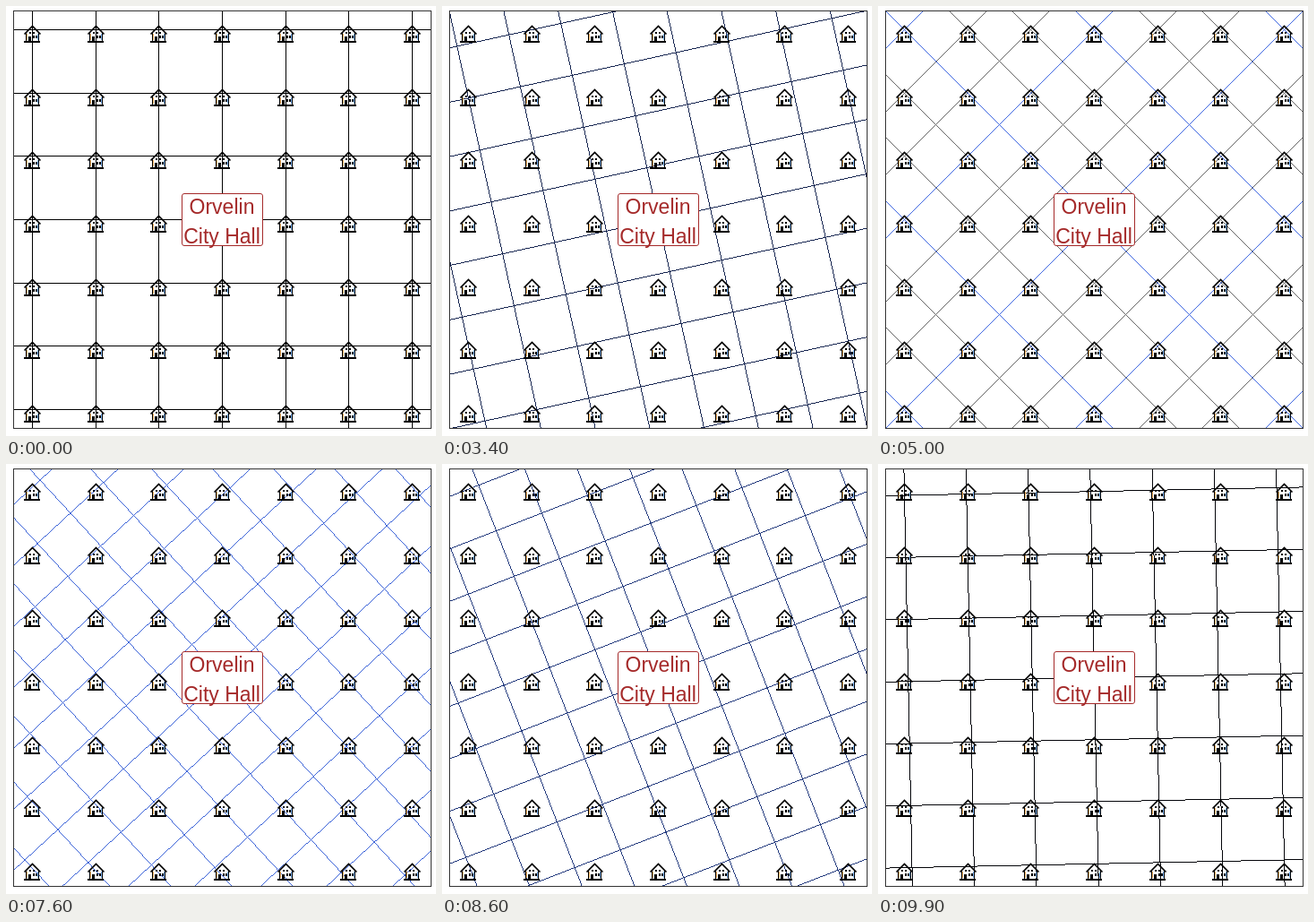
Animation, 480 px wide and 480 px high, one loop 10000 ms. Source, as an HTML page with a canvas:

```html
<!DOCTYPE html>
<html lang="en">
<head>
<meta charset="utf-8">
<title>Rotating street grid</title>
<style>
  html, body { margin: 0; width: 100%; height: 100%; overflow: hidden; background: #fff; }
  canvas { display: block; width: 480px; height: 480px; }
</style>
</head>
<body>
<canvas id="stage" width="480" height="480"></canvas>
<script>
const ctx = document.getElementById('stage').getContext('2d');
const CX = 241, CY = 238, BLOCK = 212 / 3;
const LEFT = 8, TOP = 5, RIGHT = 474, BOTTOM = 471;
const STEPS = 25, TICK = 100, TURN = 2600, BACK = 7600, LOOP = 10000;
const BLUE = [65, 105, 225];
const BROWN = '#a52a2a';

function stepAt(time) {
  if (time < TURN) return 0;
  if (time < BACK) return Math.min(STEPS, Math.floor((time - TURN) / TICK) + 1);
  return Math.max(0, STEPS - 1 - Math.floor((time - BACK) / TICK));
}

// Streets turn 45 degrees while shrinking, as a linear blend of the two grids.
function drawStreets(step) {
  const t = step / STEPS, h = t / 2;
  const slope = h / (1 - h);
  const gap = BLOCK * ((1 - h) ** 2 + h * h) / (1 - h);
  const color = `rgb(${BLUE.map(c => Math.round(c * t))})`;

  for (let n = -8; n <= 8; n++) {
    // On the full diagonal only every third street stays blue.
    ctx.fillStyle = step === STEPS && n % 3 ? '#666' : color;
    for (let x = LEFT + 1; x < RIGHT; x++) {
      const y = Math.round(CY - slope * (x - CX) + n * gap);
      if (y > TOP && y < BOTTOM) ctx.fillRect(x, y, 1, 1);
    }
    for (let y = TOP + 1; y < BOTTOM; y++) {
      const x = Math.round(CX + slope * (y - CY) + n * gap);
      if (x > LEFT && x < RIGHT) ctx.fillRect(x, y, 1, 1);
    }
  }
}

function box(color, x, y, w, h) {
  ctx.fillStyle = color;
  ctx.fillRect(x, y, w, h);
}

function drawHouse(x, y) {
  ctx.save();
  ctx.translate(x, y);
  box('#f0b060', -6, 0, 1, 7);
  box('#80b8f8', 6, 0, 1, 7);
  box('#000', -7, -1, 1, 9);
  box('#000', 7, -1, 1, 9);
  box('#000', -9, 8, 18, 2);
  box('#000', -3, -2, 2, 2);
  box('#000', 1, -2, 2, 2);
  box('#000', -4, 3, 3, 5);
  box('#000', 1, 2, 2, 3);
  box('#000', 4, 2, 2, 3);
  ctx.strokeStyle = '#000';
  ctx.lineWidth = 1.7;
  ctx.beginPath();
  ctx.moveTo(-8.5, 0.5);
  ctx.lineTo(0.5, -8.5);
  ctx.lineTo(9.5, 0.5);
  ctx.stroke();
  ctx.restore();
}

function drawHouses() {
  for (let i = -3; i <= 3; i++) {
    for (let j = -3; j <= 3; j++) {
      if (i || j) drawHouse(Math.round(CX + i * BLOCK), Math.round(CY + 5 + j * BLOCK));
    }
  }
}

function drawHall() {
  ctx.beginPath();
  ctx.roundRect(196.5, 209.5, 90, 58, 2.5);
  ctx.fillStyle = '#fff';
  ctx.fill();
  ctx.strokeStyle = BROWN;
  ctx.lineWidth = 1;
  ctx.stroke();
  ctx.fillStyle = BROWN;
  ctx.font = '23px "Liberation Sans", Arial, sans-serif';
  ctx.textAlign = 'center';
  ctx.fillText('Orvelin', CX, 232);
  ctx.fillText('City Hall', CX, 265);
}

function draw(step) {
  box('#fff', 0, 0, 480, 480);
  drawStreets(step);
  drawHouses();
  ctx.strokeStyle = '#333';
  ctx.lineWidth = 1;
  ctx.strokeRect(LEFT + 0.5, TOP + 0.5, RIGHT - LEFT, BOTTOM - TOP);
  drawHall();
}

let shown = 0;
const start = performance.now();
draw(shown);

function frame() {
  const step = stepAt((performance.now() - start) % LOOP);
  if (step !== shown) draw(shown = step);
  requestAnimationFrame(frame);
}
requestAnimationFrame(frame);
</script>
</body>
</html>
```
